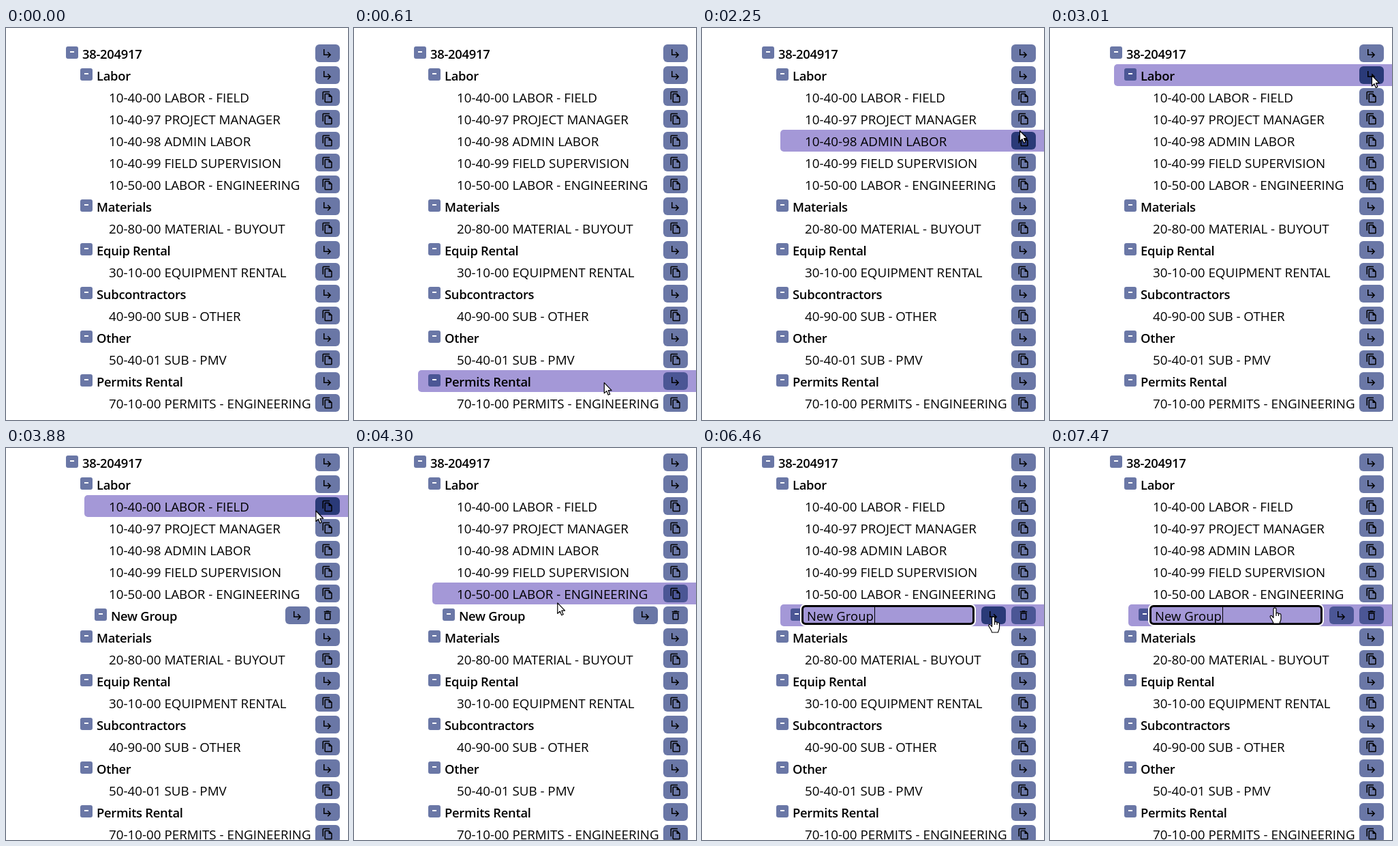
Recreate the animation shown at these times as an HTML page. Size 502 px wide and 574 px high, loop 8 s.

```html
<!DOCTYPE html>
<html lang="en">
<head>
<meta charset="utf-8">
<title>Cost code tree</title>
<style>
  html, body { margin: 0; width: 100%; height: 100%; overflow: hidden; background: #fff; }
  #stage { position: relative; width: 502px; height: 574px; overflow: hidden;
    font: 18.8px "Open Sans", "Noto Sans", sans-serif; color: #000; cursor: default; }
  #tree { position: absolute; top: 21px; left: 0; width: 100%; }
  #tree.grown { top: 5px; }
  .row { position: relative; height: 32px; --x: calc(73px + 21px * var(--level)); }
  .row.new { display: none; }
  .grown .row.new { display: block; }
  .bar { position: absolute; left: var(--x); right: 0; top: 0; height: 32px; border-radius: 5px 0 0 5px; }
  .hot .bar { background: #a498d7; }
  .label { position: absolute; left: calc(var(--x) + 36px); top: 1px; line-height: 32px; white-space: pre; }
  .group .label { left: calc(var(--x) + 39px); font-size: 18.4px; font-weight: 600; letter-spacing: -.28px; }
  .toggle, .btn { position: absolute; background: #6a77a6; }
  .toggle { left: calc(var(--x) + 15px); top: 6px; width: 18px; height: 18px; border-radius: 3px; }
  .toggle::after { content: ""; position: absolute; left: 6px; top: 7px; width: 6px; height: 2px; background: #fff; }
  .btn { left: 454px; top: 3px; width: 36px; height: 26px; border-radius: 6px; }
  .btn.second { left: 410px; }
  .btn svg { position: absolute; left: 9px; top: 4px; width: 18px; height: 18px; }
  .hot .toggle, .hot .btn { background: #4b5695; }
  .hot .btn.over { background: #2a3a78; }
  .field { display: none; position: absolute; left: 146px; top: 1px; width: 254px; height: 29px;
    box-sizing: border-box; border: 3px solid #000; border-radius: 6px; background: #fff; box-shadow: 0 0 0 2px #fff; }
  .hot .field { background: #a498d7; }
  .caret { display: none; position: absolute; left: 253px; top: 4px; width: 1px; height: 24px; background: #000; }
  .editing .field { display: block; }
  .editing .label { font-weight: 500; letter-spacing: .1px; }
  .editing.blink .caret { display: block; }
  #cursor { position: absolute; left: 0; top: 0; overflow: visible; width: 1px; height: 1px; }
  #cursor path { fill: #fff; stroke: #000; stroke-width: 1.2; stroke-linejoin: round; }
  #hand, .pointing #arrow { display: none; }
  .pointing #hand { display: block; }
</style>
</head>
<body>
<div id="stage">
  <div id="tree"></div>
  <svg id="cursor">
    <path id="arrow" d="M.5 .5V16L4 12.7 6.4 18.4 8.9 17.3 6.5 11.7H11.3Z"/>
    <g id="hand">
      <path d="M-2 2C-2-.6 2-.6 2 2V8C3 6.8 5.3 7.2 5.5 9 6.7 8 9 8.6 9 10.6V16C9 19 7.5 20 7 23H-2C-2.5 20-5 17-6.5 14-7.6 11.3-5 10.5-3.5 13L-2 14.5Z"/>
      <path d="M2 8V12M5.5 9V12"/>
    </g>
  </svg>
</div>
<script>
const LOOP = 8000, GROW = 3540, EDIT = 4640, REFOCUS = 5300, BLINK = 540;
const HOVER_LAG = 40, ROW = 32, WIDTH = 502, HEIGHT = 574;

const TREE = `38-204917
 Labor
  10-40-00 LABOR - FIELD
  10-40-97 PROJECT MANAGER
  10-40-98 ADMIN LABOR
  10-40-99 FIELD SUPERVISION
  10-50-00 LABOR - ENGINEERING
  New Group
 Materials
  20-80-00 MATERIAL - BUYOUT
 Equip Rental
  30-10-00 EQUIPMENT RENTAL
 Subcontractors
  40-90-00 SUB - OTHER
 Other
  50-40-01 SUB - PMV
 Permits Rental
  70-10-00 PERMITS - ENGINEERING`.split('\n');
const NEW_ROW = TREE.findIndex(line => line.endsWith('New Group'));

const ICONS = {
  nest: 'M4 4H6V14H15.2L11.6 10.4 13 9 19 15 13 21 11.6 19.6 15.2 16H4Z',
  copy: 'M2 17V3Q2 1 4 1H16V3H4V17ZM15 5L21 11V21Q21 23 19 23H8Q6 23 6 21V7Q6 5 8 5ZM8 7V21H19V12H14V7Z',
  trash: 'M6 7H18V19Q18 21 16 21H8Q6 21 6 19ZM8 9V19H16V9ZM5 4H8.5L9.5 3H14.5L15.5 4H19V6H5Z'
};

// each pointer move eases to x, y; sag bows the path up or down
const START = { x: 520, y: 580 };
const MOVES = [
  { from: 120, to: 950, x: 279, y: 580, sag: -66 },
  { from: 950, to: 1340, x: 413, y: 575 },
  { from: 1410, to: 2250, x: 466, y: 150 },
  { from: 2250, to: 2670, x: 471, y: 104, sag: 40 },
  { from: 2800, to: 3010, x: 472, y: 69 },
  { from: 3740, to: 4580, x: 238, y: 247, sag: 33 },
  { from: 4970, to: 5380, x: 264, y: 244 },
  { from: 5510, to: 5650, x: 310, y: 236 },
  { from: 6110, to: 6590, x: 453, y: 243, sag: 9 },
  { from: 6720, to: 7210, x: 330, y: 234 }
];

const $ = id => document.getElementById(id);
const stage = $('stage'), tree = $('tree'), cursor = $('cursor');

const button = (icon, extra = '') =>
  `<div class="btn ${extra}"><svg viewBox="0 0 24 24" fill-rule="evenodd"><path d="${ICONS[icon]}"/></svg></div>`;

const rows = TREE.map((line, i) => {
  const text = line.trim(), level = line.length - text.length;
  const isNew = i === NEW_ROW, group = level < 2 || isNew;
  const el = document.createElement('div');
  el.className = `row ${group ? 'group' : ''} ${isNew ? 'new' : ''}`;
  el.style.setProperty('--level', level);
  el.innerHTML = '<div class="bar"></div>' +
    (group ? '<div class="toggle"></div>' : '') +
    (isNew ? '<div class="field"></div>' : '') +
    `<div class="label">${text}</div>` +
    (isNew ? '<div class="caret"></div>' + button('nest', 'second') + button('trash')
           : button(group ? 'nest' : 'copy'));
  tree.append(el);
  return { el, buttons: [...el.querySelectorAll('.btn')] };
});

const smooth = k => k * k * (3 - 2 * k);

function pointerAt(t) {
  let { x, y } = START;
  for (const m of MOVES) {
    if (t < m.from) break;
    const k = smooth(Math.min(1, (t - m.from) / (m.to - m.from)));
    x += (m.x - x) * k;
    y += (m.y - y) * k + (m.sag || 0) * 4 * k * (1 - k);
  }
  return { x, y };
}

function hoverAt(t, grown) {
  const { x, y } = pointerAt(t);
  if (x >= WIDTH || y >= HEIGHT) return { row: -1 };
  const depth = y - (grown ? 5 : 21);
  const slot = Math.floor(depth / ROW);
  const row = !grown && slot >= NEW_ROW ? slot + 1 : slot;
  return { row, x, inset: depth - slot * ROW };
}

function draw() {
  const t = performance.now() % LOOP;
  const grown = t >= GROW;
  const { x, y } = pointerAt(t);
  const hover = hoverAt(t - HOVER_LAG, grown);

  tree.classList.toggle('grown', grown);
  rows.forEach(({ el, buttons }, i) => {
    const hot = i === hover.row;
    el.classList.toggle('hot', hot);
    for (const b of buttons) {
      const dx = hover.x - b.offsetLeft, dy = hover.inset - b.offsetTop;
      b.classList.toggle('over', hot && dx >= 0 && dx < 36 && dy >= 0 && dy < 26);
    }
  });

  const fresh = rows[NEW_ROW].el.classList;
  const sinceFocus = t - (t < REFOCUS ? EDIT : REFOCUS);
  fresh.toggle('editing', t >= EDIT);
  fresh.toggle('blink', Math.floor(sinceFocus / BLINK) % 2 === 0);
  stage.classList.toggle('pointing', hover.row === NEW_ROW);
  cursor.style.transform = `translate(${x}px, ${y}px)`;
  requestAnimationFrame(draw);
}
draw();
</script>
</body>
</html>
```
